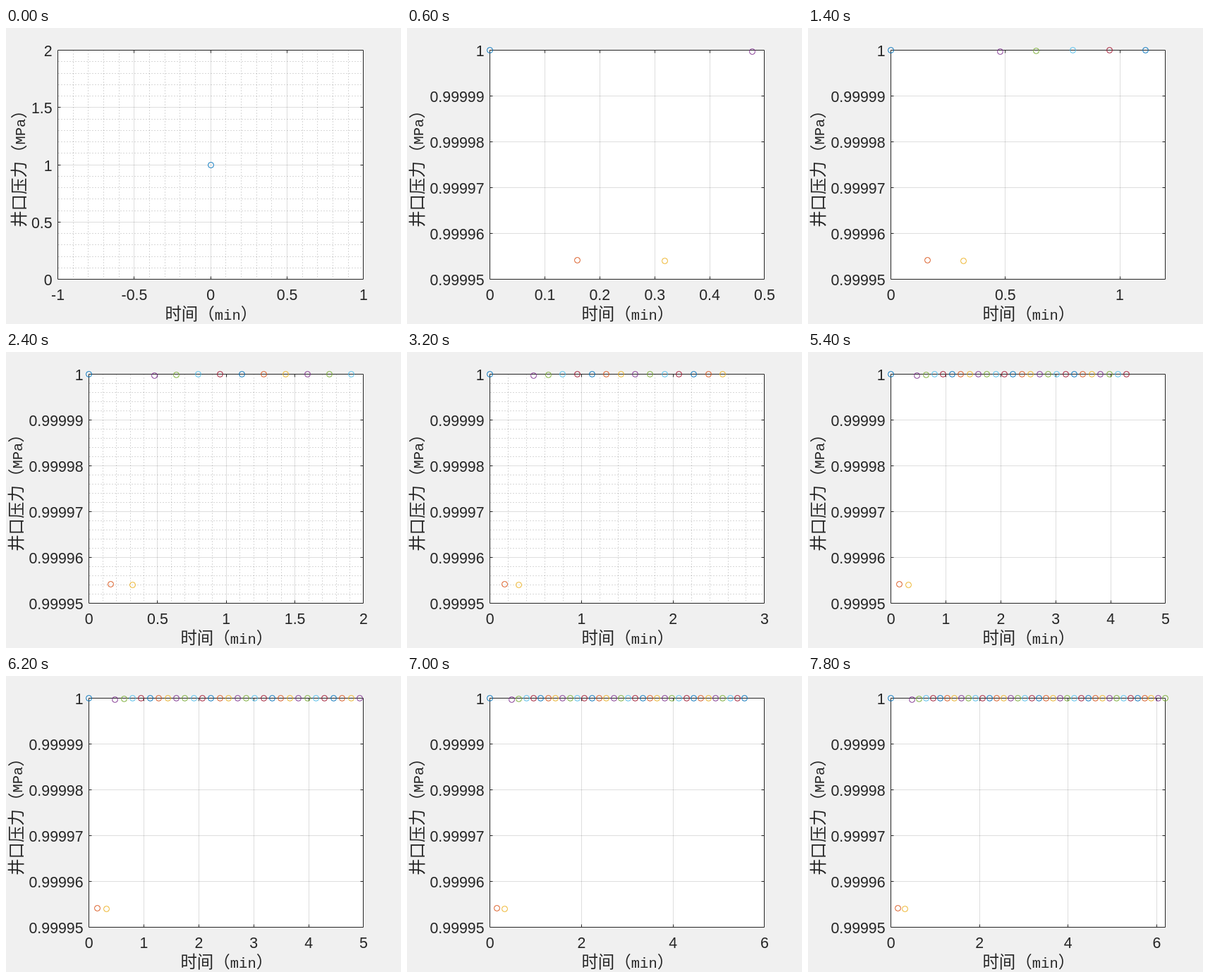
Recreate the animation shown at these times as an HTML page. Size 560 px wide and 420 px high, loop 8 s.

```html
<!DOCTYPE html>
<html lang="zh">
<head>
<meta charset="utf-8">
<style>
  html, body { margin: 0; width: 100%; height: 100%; overflow: hidden; background: #f0f0f0; }
  svg { display: block; }
  text { fill: #262626; font: 21.33px "Liberation Sans", Arial, sans-serif; }
  .label { font: 23.47px "Noto Sans CJK SC", "Noto Sans CJK", "Noto Sans CJK JP", sans-serif; text-anchor: middle; }
  .label tspan { font: 20.5px "Liberation Mono", monospace; }
  path, circle { fill: none; stroke-width: 1; }
  .axis { stroke: #262626; }
  .major { stroke: #262626; stroke-opacity: .15; }
  .minor { stroke: #1a1a1a; stroke-opacity: .17; stroke-dasharray: 2 2; }
</style>
</head>
<body>
<svg id="plot" width="560" height="420" viewBox="0 0 560 420"></svg>
<script>
const svg = document.getElementById('plot');
const COLORS = ['#0072bd', '#d95319', '#edb120', '#7e2f8e', '#77ac30', '#4dbeee', '#a2142f'];
const STEP_MS = 200, STEPS = 40, DT = 0.159;
const RIGHT = 506.95, TOP = 31.5, BOTTOM = 356.5, TICK = 4;
const DROPS = [0, 4.586e-5, 4.594e-5, 3.8e-7, 2e-7];   // pressure loss of the first samples

const snap = v => Math.floor(v + 1e-6) + 0.5;
const pressure = i => 1 - (DROPS[i] || 0);

// Smallest 1-2-5 step that splits the range into at most five parts
function niceStep(range) {
  const raw = range / 5, base = 10 ** Math.floor(Math.log10(raw));
  return [1, 2, 5, 10].find(s => s * base >= raw - 1e-9) * base;
}

// Round up to a tick, but hug the data when that wastes too much room
function upperLimit(x, step) {
  const hi = Math.ceil(x / step - 1e-6) * step;
  if (x / hi >= 0.8) return hi;
  const base = 10 ** Math.floor(Math.log10(x));
  return x / base < 2 ? Math.ceil(x / base * 5) / 5 * base : x;
}

function marks(lo, hi, step) {
  const out = [];
  for (let i = Math.ceil(lo / step - 1e-3); i <= hi / step + 1e-3; i++) out.push(i * step);
  return out;
}

function minorMarks(lo, hi, step) {
  const parts = /^2/.test(step.toExponential(3)) ? 4 : 5;
  return marks(lo, hi, step / parts).filter(v => {
    const r = v / step;
    return Math.abs(r - Math.round(r)) > 0.05;
  });
}

function axes(n) {
  if (!n) return { left: 73.6, labelX: 27.4, x: [-1, 1, 0.5], y: [0, 2, 0.5] };
  const last = n * DT, step = niceStep(last);
  return { left: 117.6, labelX: 23.4, x: [0, upperLimit(last, step), step], y: [0.99995, 1, 1e-5] };
}

function draw(n) {
  const { left, labelX, x, y } = axes(n);
  const px = v => left + (v - x[0]) / (x[1] - x[0]) * (RIGHT - left);
  const py = v => BOTTOM - (v - y[0]) / (y[1] - y[0]) * (BOTTOM - TOP);
  const sx = v => snap(px(v)), sy = v => snap(py(v));
  const x0 = snap(left), x1 = snap(RIGHT);
  const vline = v => `M${sx(v)} ${TOP + 0.5}V${BOTTOM - 0.5}`;
  const hline = v => `M${x0 + 0.5} ${sy(v)}H${x1 - 0.5}`;
  const path = (cls, d) => `<path class="${cls}" d="${d}"/>`;
  const text = (v, tx, ty, anchor) =>
    `<text x="${tx}" y="${ty}" text-anchor="${anchor}">${+v.toFixed(5)}</text>`;
  const xs = marks(...x), ys = marks(...y);
  const inner = (list, [lo, hi]) =>
    list.filter(v => v > lo + (hi - lo) * 0.002 && v < hi - (hi - lo) * 0.002);
  const gx = inner(xs, x), gy = inner(ys, y);

  let out = `<rect width="560" height="420" fill="#f0f0f0"/>
    <rect x="${x0}" y="${TOP}" width="${x1 - x0}" height="${BOTTOM - TOP}" fill="#fff"/>`;
  if (n % 2 === 0) {
    const minor = [...inner(minorMarks(...x), x).map(vline), ...minorMarks(...y).map(hline)];
    out += path('minor', minor.join(''));
  }
  out += path('major', gx.map(vline).join('') + gy.map(hline).join(''));
  out += path('axis', `M${x0} ${TOP}H${x1}V${BOTTOM}H${x0}Z` +
    gx.map(v => `M${sx(v)} ${TOP}v${TICK}M${sx(v)} ${BOTTOM}v${-TICK}`).join('') +
    gy.map(v => `M${x0} ${sy(v)}h${TICK}M${x1} ${sy(v)}h${-TICK}`).join(''));

  out += xs.map(v => text(v, px(v), 386, 'middle')).join('');
  out += ys.map(v => text(v, left - 8, sy(v) + 8.5, 'end')).join('');
  out += `<text class="label" x="${(left + RIGHT) / 2 + 0.5}" y="414">时间（<tspan>min</tspan>）</text>
    <text class="label" transform="translate(${labelX} 194) rotate(-90)">井口压力（<tspan>MPa</tspan>）</text>`;

  for (let i = 0; i <= n; i++) {
    out += `<circle cx="${sx(i * DT)}" cy="${sy(pressure(i))}" r="4" stroke="${COLORS[i % 7]}"/>`;
  }
  svg.innerHTML = out;
}

let shown = -1;
function frame() {
  const n = Math.floor(performance.now() / STEP_MS) % STEPS;
  if (n !== shown) draw(shown = n);
  requestAnimationFrame(frame);
}
frame();
</script>
</body>
</html>
```
